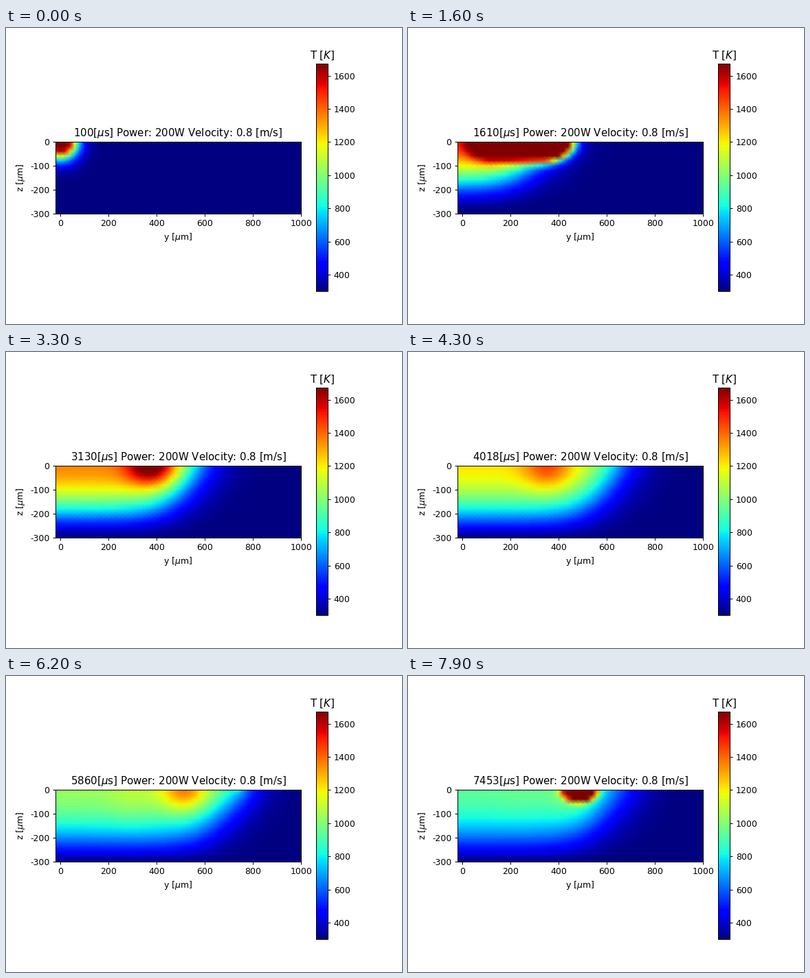
Animation of 576 by 432 pixels, one loop 8 s. Source, as a matplotlib script:

```python
import matplotlib.pyplot as plt
import numpy as np
from matplotlib.animation import FuncAnimation

plt.rcParams.update({"font.family": "DejaVu Sans", "axes.unicode_minus": False})

FRAMES, INTERVAL = 80, 100
T_MIN, T_MAX = 300, 1673
CELL = 20  # node spacing in micrometres

# Time steps are 100 us, with shorter ones where a scan segment ends.
steps = np.full(FRAMES, 100)
steps[[9, 19, 24]] = 10
steps[[34, 43]] = 44
steps[[54, 63, 71]] = 42, 46, 47
clock = np.cumsum(steps)

# Later laser spots: centre, switch-on, switch-off, half length
SPOTS = [(550, 4150, 4900, 75), (737, 4850, 5300, 15), (487, 6800, 8000, 65)]

y, z = np.meshgrid(np.arange(-20, 1001, CELL), np.arange(-300, 1, CELL))
mode = np.clip(np.cos(np.pi * z / 600), 0, 1)  # cold base, insulated top


def body(t):
    """Broad heated zone: a front that spreads and slowly cools."""
    level = min((t - 100) / 1800, 0.95, 0.93 * (2230 / t) ** 0.58)
    power = 1 + np.exp(-(t / 3000) ** 3)
    front = 790 * (1 - np.exp(-(t / 2700) ** 1.2)) - 0.16 * max(t - 6653, 0)
    return level * mode ** power / (1 + np.exp((y - front - 0.5 * z) / 62))


def glow(age, centre, size):
    """Heat left behind by a melt pool that has solidified."""
    if age <= 0:
        return 0
    level = 0.6 * min(size / 75, 1) * np.exp(-age / 1300) * (1 - np.exp(-age / 60))
    depth = 70 + 0.025 * age
    return level * mode * np.exp(-((y - centre + 0.03 * age) / 100) ** 2
                                 - (z / depth) ** 2)


def pool(centre, half, depth, flat, edge):
    """Molten capsule with a steep rim; a negative half length fades it out."""
    radius = min(half, depth * flat)
    along = np.maximum(np.abs(y - centre) - max(half - radius, 0), 0)
    dist = np.maximum(np.hypot(along, flat * z) - radius, 0)
    return np.exp(-(dist / edge) ** 1.4)


def long_pool(t):
    front = min(13.5 * np.sqrt(t) - 98, 545 - 0.4 * (t - 2230))
    rear = max(265 + 0.4 * (t - 2230), -abs(front))
    flat = 1 + min(t / 2230, 1) ** 2
    return pool((front + rear) / 2, (front - rear) / 2, 95 - 0.0135 * t, flat,
                max(41 - 0.007 * t, 20))


def spot_pool(t, centre, on, off, size):
    half = size * min((t - on) / 150, 1, (off - t) / 150)
    return pool(centre, half, size, 1.4, 38 - size / 3)


def temperature(t):
    heat = body(t) + glow(t - 2500, 400, 75)
    for centre, on, off, size in SPOTS:
        heat = heat + glow(t - off + 100, centre, size)
    cold = 1 - np.clip(heat, 0, 1)
    if t < 3500:
        cold = cold * (1 - long_pool(t))
    for spot in SPOTS:
        cold = cold * (1 - spot_pool(t, *spot))
    return T_MIN + (T_MAX - T_MIN) * (1 - cold)


def caption(t):
    return rf"{t}[$\mu$s] Power: 200W Velocity: 0.8 [m/s]"


fig, ax = plt.subplots(figsize=(6.4, 4.8), dpi=90)
mesh = ax.pcolormesh(y, z, temperature(clock[0]), shading="gouraud", cmap="jet",
                     vmin=T_MIN, vmax=T_MAX)
ax.set_aspect("equal")
ax.set(xlim=(-20, 1000), ylim=(-300, 0), xticks=range(0, 1001, 200),
       yticks=range(-300, 1, 100), xlabel=r"y [$\mu$m]", ylabel=r"z [$\mu$m]")
title = ax.set_title(caption(clock[0]))
bar = fig.colorbar(mesh, ax=ax, ticks=range(400, 1601, 200))
bar.ax.set_title("T [$K$]")


def update(i):
    mesh.set_array(temperature(clock[i]))
    title.set_text(caption(clock[i]))
    return mesh, title


anim = FuncAnimation(fig, update, frames=FRAMES, interval=INTERVAL,
                     repeat=True, repeat_delay=0)
plt.show()
```
